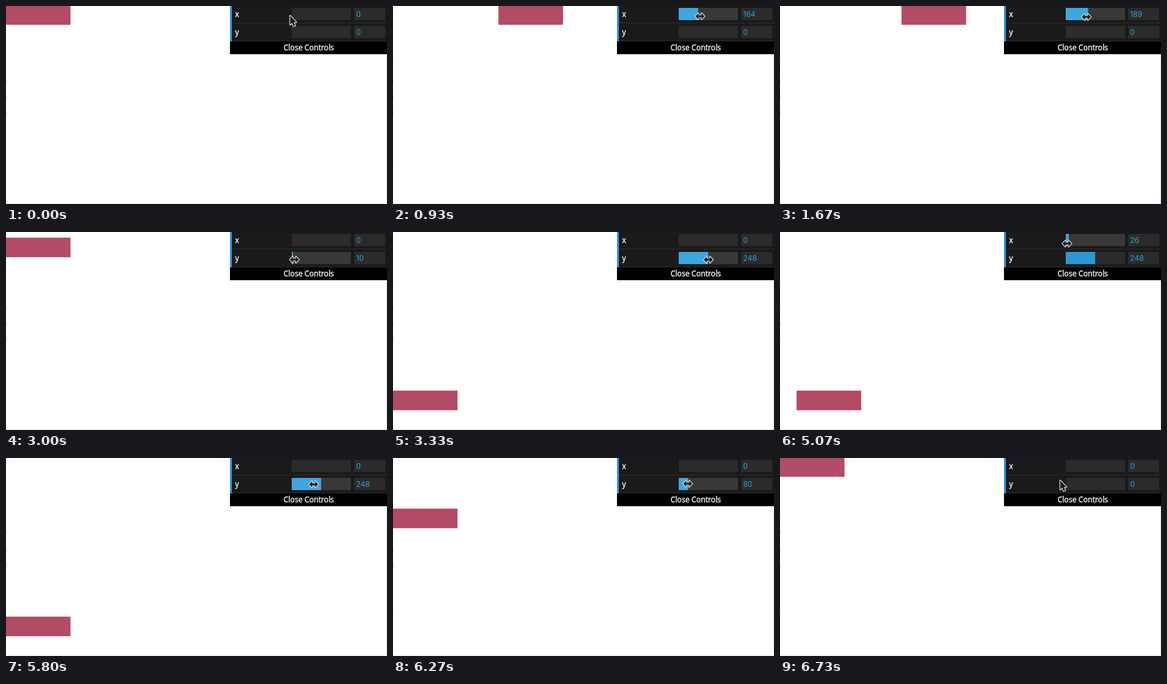
An HTML page that plays this animation: 592 by 308 pixels, repeating every 6870 ms.

```html
<!DOCTYPE html>
<html lang="en">
<head>
<meta charset="utf-8">
<title>Slider controls</title>
<style>
  html, body { margin: 0; width: 100%; height: 100%; overflow: hidden; background: #fff; }
  svg { display: block; width: 592px; height: 308px; }
  text { font: 400 11.7px "Open Sans", "Noto Sans", sans-serif; fill: #fff; stroke: #fff; stroke-width: .35; }
  .num { font: 400 11.5px Inter, "Liberation Sans", sans-serif; fill: #2fa1d6; stroke: none; }
  .track, .field { fill: #2b2b2b; }
  .bar { fill: #2b97d4; }
  .hot .track { fill: #383838; }
  .hot .bar { fill: #3ea6de; }
  .cursor { fill: #1c1c1c; stroke: #d8d8d8; stroke-width: 2.4; stroke-linejoin: round; paint-order: stroke; }
</style>
</head>
<body>
<svg viewBox="0 0 592 308">
  <path d="M591.5 75V308M0 307.5H592" stroke="#e6e6e6" fill="none"/>
  <path d="M.5 84v2m0 28v5m0 21v5m0 18v7m0 72v2" stroke="#ddd"/>
  <rect id="box" y="-1" width="100" height="30" fill="#b24c66" stroke="#b24c66" stroke-opacity=".5"/>

  <rect x="348" width="244" height="55" fill="#1a1a1a"/>
  <path d="M351 26.5H592M351 54.5H592" stroke="#2c2c2c"/>
  <rect x="348" width="3" height="55" fill="#2f97dd"/>
  <g id="rowX">
    <text x="356" y="17">x</text>
    <rect class="track" x="444" y="3" width="92" height="19"/>
    <rect class="bar" x="444" y="3" height="19"/>
    <rect class="field" x="541" y="3" width="48" height="19"/>
    <text class="num" x="544" y="17">0</text>
  </g>
  <g id="rowY" transform="translate(0 28)">
    <text x="356" y="17">y</text>
    <rect class="track" x="444" y="3" width="92" height="19"/>
    <rect class="bar" x="444" y="3" height="19"/>
    <rect class="field" x="541" y="3" width="48" height="19"/>
    <text class="num" x="544" y="17">0</text>
  </g>
  <rect x="348" y="55" width="244" height="20" fill="#000"/>
  <text x="470.5" y="69" text-anchor="middle">Close Controls</text>

  <path id="arrow" class="cursor" d="M.5 1V15L3.6 12.2 5.8 17.4 8.2 16.4 6 11.2H10Z"/>
  <path id="resize" class="cursor" d="M-7 0L-2.4-4.8V-1.4H2.4V-4.8L7 0 2.4 4.8V1.4H-2.4V4.8Z"/>
</svg>
<script>
const LOOP = 6870, MAX = 500, LEFT = 444, TRACK = 92;

// Pointer moves: start ms, end ms, destination
const moves = [
  [60, 200, 449, 15],
  [600, 1270, 507, 17],
  [1330, 2070, 436, 17],
  [2130, 2800, 446, 43],
  [2951, 3330, 490, 43],
  [3560, 3800, 548, 33],
  [3800, 4130, 447, 18],
  [4367, 4730, 481, 18],
  [4830, 5145, 441, 18],
  [5145, 5530, 452, 40],
  [5560, 5930, 488, 42],
  [6030, 6420, 443, 39],
  [6420, 6730, 435, 34]
];

const $ = id => document.getElementById(id);
const place = (el, x, y) => el.setAttribute("transform", `translate(${x} ${y})`);
const show = (el, on) => el.setAttribute("visibility", on ? "visible" : "hidden");

function ease(t, from, to) {
  const u = Math.min(1, Math.max(0, (t - from) / (to - from)));
  return (1 - Math.cos(Math.PI * u)) / 2;
}

// Rise to a peak, hold, fall back to zero.
const swing = (t, peak, up, top, down, end) =>
  peak * (ease(t, up, top) - ease(t, down, end));

function pointer(t) {
  let x = 441, y = 14;
  for (const [from, to, toX, toY] of moves) {
    const f = ease(t, from, to);
    x += (toX - x) * f;
    y += (toY - y) * f;
  }
  return [Math.round(x), Math.round(y)];
}

// The picture advances 15 times a second, on whole hundredths.
const stamp = k => Math.round(k * 20 / 3) * 10;
function tick(ms) {
  let k = Math.ceil(ms * .015);
  while (stamp(k) > ms) k--;
  return stamp(k);
}

function setRow(row, value, hovered) {
  row.querySelector(".bar").setAttribute("width", value / MAX * TRACK);
  row.querySelector(".num").textContent = value;
  row.classList.toggle("hot", hovered && value > 0);
}

function draw(ms) {
  const t = tick(ms % LOOP);
  const x = Math.round(swing(t, 335, 600, 1270, 1330, 2070) + swing(t, 196, 4367, 4730, 4830, 5145));
  const y = Math.round(swing(t, 248, 2951, 3330, 6030, 6420));
  const [mx, my] = pointer(t);
  const sliding = mx >= LEFT && mx <= LEFT + TRACK;

  place($("box"), x, y);
  setRow($("rowX"), x, sliding && my < 27);
  setRow($("rowY"), y, sliding && my > 27);
  show($("arrow"), !sliding);
  show($("resize"), sliding);
  place($(sliding ? "resize" : "arrow"), mx, my);
}

const start = performance.now();
function loop() {
  draw(performance.now() - start);
  requestAnimationFrame(loop);
}
draw(0);
requestAnimationFrame(loop);
</script>
</body>
</html>
```
